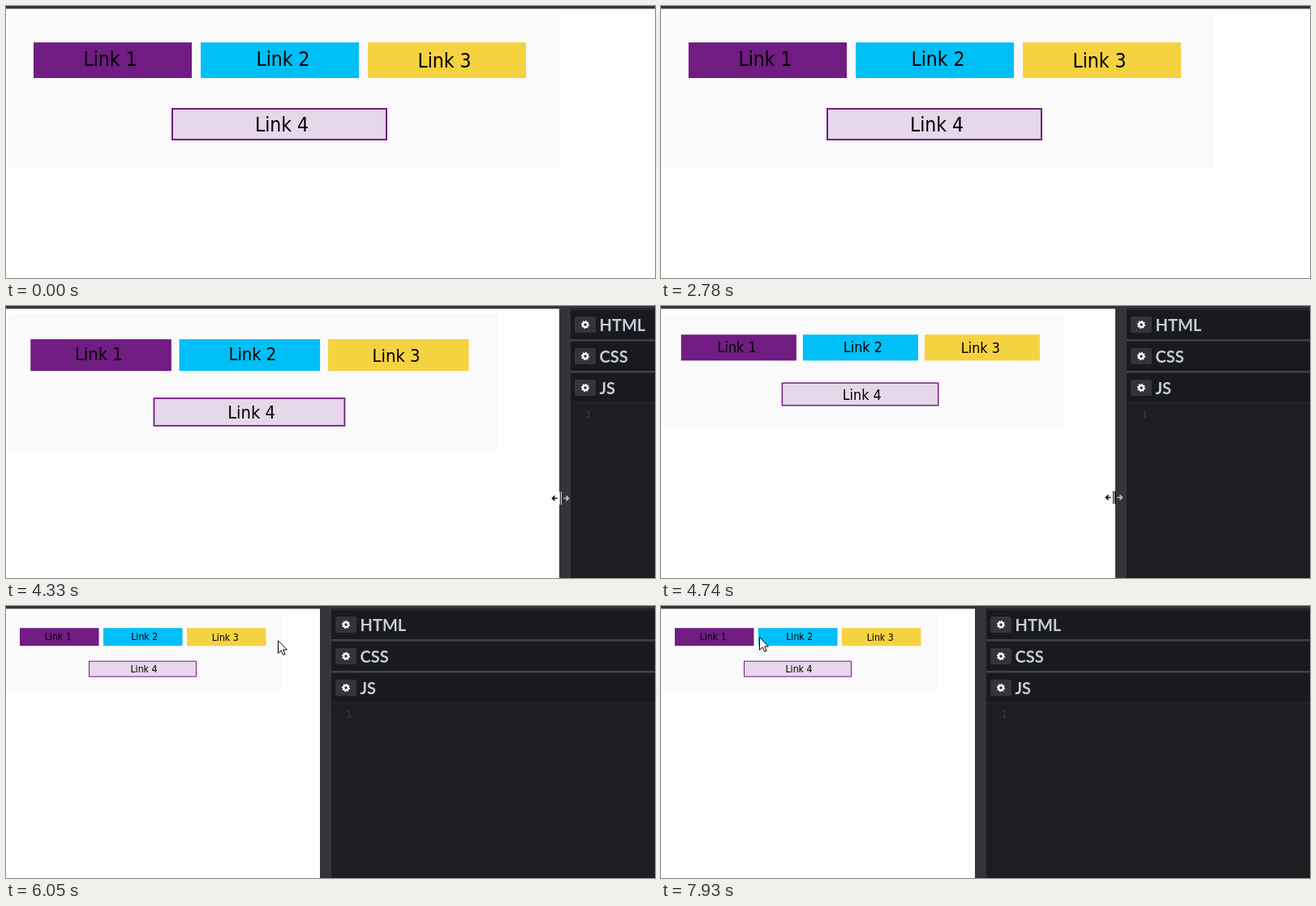
Recreate the animation shown at these times as an HTML page. Size 800x336 px, loop 8000 ms.

```html
<!DOCTYPE html>
<html lang="en">
<head>
<meta charset="utf-8">
<title>Links and split pane</title>
<style>
  html, body { margin: 0; width: 100%; height: 100%; overflow: hidden; background: #fff; }
  svg { display: block; width: 100%; height: 100%; }
  .link { font: 24.5px "DejaVu Sans Condensed", "Open Sans", "Noto Sans", sans-serif; text-anchor: middle; }
  .head { font: bold 20px Lato, sans-serif; fill: #c7cbd8; }
  .num { font: 13px "DejaVu Sans Mono", monospace; fill: #38393d; }
</style>
</head>
<body>
<svg viewBox="0 0 800 336">
  <defs>
    <g id="gear" fill="none" stroke="#fff">
      <circle r="2.8" stroke-width="2.2"/>
      <circle r="4.2" stroke-width="1.8" pathLength="16" stroke-dasharray="1.1 .9"/>
    </g>
  </defs>
  <rect width="800" height="336" fill="#fff"/>
  <rect y="3" width="800" height="1" fill="#aaa8ad"/>
  <g id="page"></g>
  <g id="editor">
    <rect width="800" height="336" fill="#1d1e22"/>
    <g id="heads"></g>
    <text class="num" x="32" y="138">1</text>
    <rect width="14" height="336" fill="#343539"/>
  </g>
  <rect width="800" height="3" fill="#36333b"/>
  <path id="arrow" d="M.5 .8V16.4L4.2 12.9 6.6 18.4 9.1 17.3 6.7 12H11.4Z" fill="#fff" stroke="#000"/>
  <path id="hand" d="M.2 1.5Q.2 -.3 1.5 -.3 3 -.3 3 1.5V7.2Q3 5.9 4.6 5.9 6.2 6 6.2 7.6 6.4 6.5 7.8 6.6 9.3 6.8 9.4 8.3 9.7 7.6 10.8 7.8 12.4 8.1 12.4 9.8V14Q12.4 16.4 10.8 18V20.5H1.8V18.4L-3.6 12.4Q-4.8 10.7 -3.3 9.9 -2.1 9.4 -1 10.8L.2 12Z" fill="#fff" stroke="#000"/>
  <g id="resize" style="mix-blend-mode:difference" fill="none" stroke="#fff">
    <path d="M-1 -8V8M1 -8V8"/>
    <path d="M-4 0H-10M-7 -3L-10 0 -7 3M4 0H10M7 -3L10 0 7 3" stroke-width="1.5"/>
  </g>
</svg>
<script>
const $ = id => document.getElementById(id);
const LOOP = 8000, TOP = 9.4, WIDTH = 682;

const links = ['#701c82', '#00bff6', '#f5d240'].map((fill, i) =>
  ({ x: 34 + 206 * i, y: 45, w: 195, h: 44, fill, stroke: 'none' }));
links.push({ x: 205, y: 127, w: 264, h: 38, fill: '#e6d7ea', stroke: '#701c82' });

$('page').innerHTML = `<rect x="3.5" y=".6" width="${WIDTH - 3.5}" height="190" fill="#fafafa"/>` +
  links.map(({ x, y, w, h, fill, stroke }, i) =>
    `<rect x="${x}" y="${y - TOP}" width="${w}" height="${h}" fill="${fill}" stroke="${stroke}" stroke-width="2"/>
     <text class="link" x="${x + w / 2 + (i % 2 ? 4 : -3) + (i === 3 ? -1 : 0)}"
       y="${y - TOP + h / 2 + (i < 2 ? 7.2 : 9.3)}">Link ${i + 1}</text>`).join('');

$('heads').innerHTML = ['HTML', 'CSS', 'JS'].map((name, i) => {
  const y = 4 + 39 * i;
  return `<rect y="${y}" width="800" height="37" fill="#191a1d"/>
    <rect y="${y}" width="800" height="1" fill="#303135"/>
    <rect y="${y + 37}" width="800" height="${i < 2 ? 2 : 1}" fill="${i < 2 ? '#414145' : '#26272b'}"/>
    <rect x="19" y="${y + 9}" width="26" height="20" rx="2.5" fill="#343539"/>
    <use href="#gear" x="32" y="${y + 19}"/>
    <text class="head" x="49.5" y="${y + 26.5}">${name}</text>`;
}).join('');

const move = (from, to, steps, ...path) => ({ from, to, steps, path });

// bursts of pointer steps along a Bezier path
const moves = [
  move(150, 610, 7, [704, 316], [590, 110], [540, 63]),
  move(910, 1460, 8, [532, 76], [440, 213], [382, 145]),
  move(1690, 1770, 2, [348, 92], [317, 45]),
  move(1920, 2076, 3, [245, 51], [125, 62]),
  move(2154, 2700, 8, [142, 72], [743, 305]),
  move(5520, 6130, 9, [390, 221], [369, 43], [324, 38]),
  move(6290, 6520, 4, [316, 38], [293, 38]),
  move(6900, 7050, 3, [297, 38], [304, 38]),
  move(7220, 7610, 6, [290, 38], [192, 38]),
  move(7780, 7930, 3, [172, 38], [121, 38])
];

// divider drag: step, divider edge, pointer offset from it
const drag = [[0, 793, 1], [7, 682, 1.5], [10, 598, 0], [12, 560, -1.5], [17, 421, 6], [21, 387, 8]];

const mix = (a, b, f) => a.map((v, i) => v + (b[i] - v) * f);

// index of the last step shown at time t
const stepAt = (t, from, to, steps) =>
  Math.min(steps - 1, Math.floor((t - from) / (to - from) * (steps - 1) + 0.1));

function bezier(points, f) {
  while (points.length > 1) points = points.slice(1).map((p, i) => mix(points[i], p, f));
  return points[0];
}

function pointerAt(t) {
  const { from, to, steps, path } = moves.filter(m => m.from <= t).pop() || moves[0];
  return bezier(path, Math.max(0, stepAt(t, from, to, steps)) / (steps - 1));
}

function dragAt(t) {
  if (t < 3800) return [0, 801, 0];
  const step = t < 4420 ? stepAt(t, 3800, 4330, 8) : 8 + stepAt(t, 4420, 5440, 14);
  const i = Math.max(1, drag.findIndex(k => k[0] >= step));
  const a = drag[i - 1], b = drag[i];
  return mix(a, b, (step - a[0]) / (b[0] - a[0]));
}

function show(id, shown, x, y) {
  $(id).setAttribute('visibility', shown ? 'visible' : 'hidden');
  $(id).setAttribute('transform', `translate(${x} ${y})`);
}

function draw(now) {
  const t = now % LOOP;
  const [step, edge, grab] = dragAt(t);
  const scale = Math.min(1, (0.9017 * edge - 8) / WIDTH);
  $('page').setAttribute('transform', `translate(0 ${TOP}) scale(${scale})`);
  $('editor').setAttribute('transform', `translate(${Math.round(edge)} 0)`);

  const [x, y] = pointerAt(t).map(Math.round);
  const free = t >= 150 && t < 2780 || t >= 5520;
  const over = t < 2780 && links.some(l => x >= l.x && x <= l.x + l.w && y >= l.y && y <= l.y + l.h);
  show('hand', free && over, x, y);
  show('arrow', free && !over, x, y);
  show('resize', t >= 3800 && t < 5520, Math.floor(edge + grab) + 0.5, Math.round(239 - step / 4) + 0.5);
}

function tick() {
  draw(performance.now());
  requestAnimationFrame(tick);
}
tick();
</script>
</body>
</html>
```
